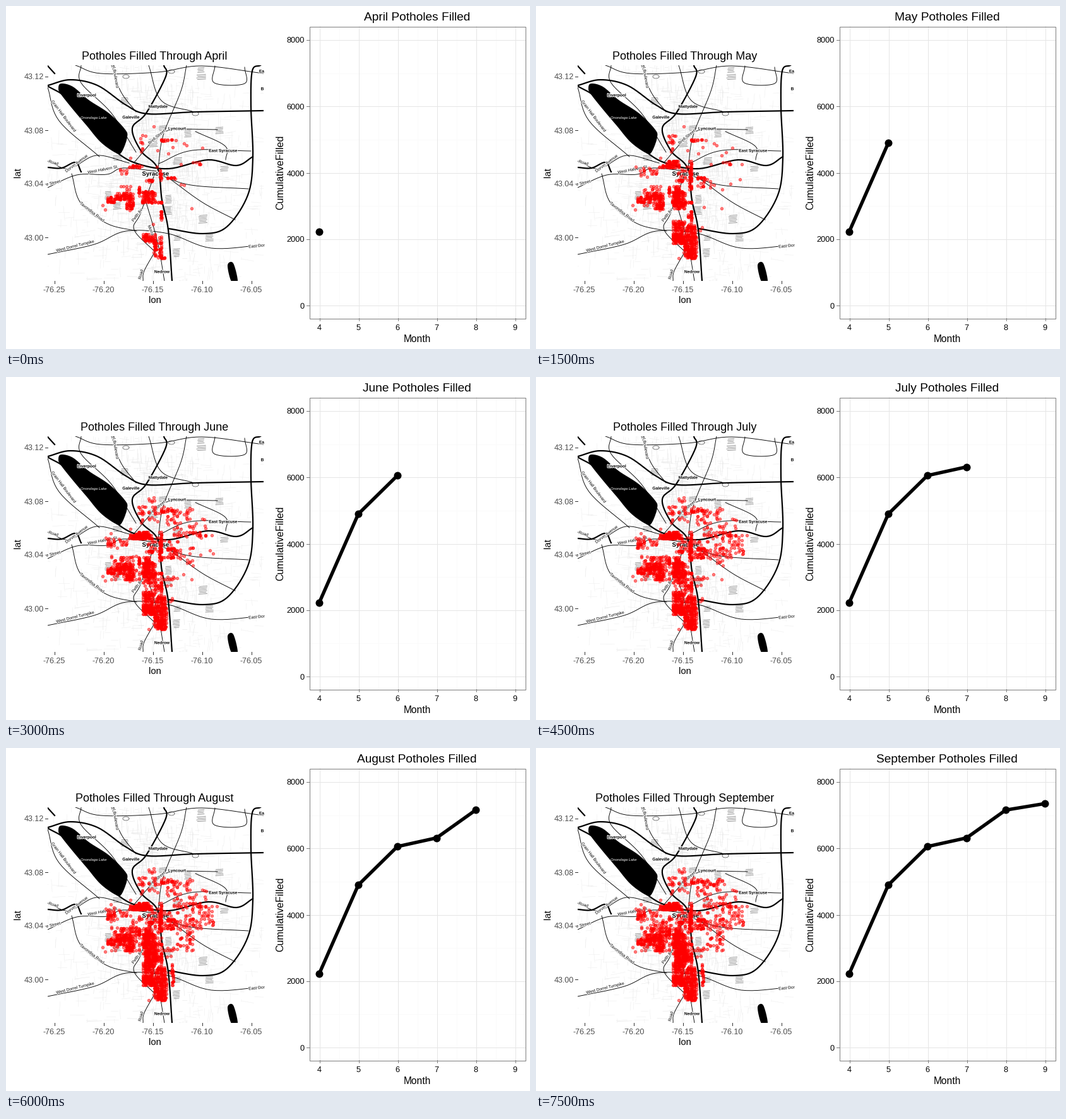
These frames come from a looping animation (830x544 px, 9000 ms). A matplotlib script:

```python
import numpy as np
import matplotlib.pyplot as plt
from matplotlib.animation import FuncAnimation
from matplotlib.collections import LineCollection
from matplotlib.patches import Polygon, Rectangle
from matplotlib.patheffects import withStroke

W, H, DPI = 830, 544, 100
PX = 72 / DPI  # points per pixel
plt.rcParams["font.family"] = "Liberation Sans"

fig = plt.figure(figsize=(W / DPI, H / DPI), dpi=DPI, facecolor="white")
ax = fig.add_axes([0, 0, 1, 1])
ax.set_xlim(0, W)
ax.set_ylim(H, 0)
ax.axis("off")
rng = np.random.default_rng(7)

MONTHS = ["April", "May", "June", "July", "August", "September"]
TOTALS = [2210, 4890, 6050, 6310, 7150, 7345]
MAP_BOX = Rectangle((66, 94), 342, 342, fc="white", ec="none", zorder=0)
ax.add_patch(MAP_BOX)


def text(x, y, s, size, **kw):
    opts = dict(ha="center", va="baseline", rotation_mode="anchor", zorder=9)
    opts.update(kw)
    return ax.text(x, y, s, fontsize=size * PX, **opts)


def line(xs, ys, color, width, **kw):
    return ax.plot(xs, ys, color=color, lw=width * PX, **kw)[0]


def clip(artist):
    artist.set_clip_path(MAP_BOX)
    return artist


def smooth(pts, closed=False):
    """Catmull-Rom curve through the given points."""
    p = np.array(pts, float)
    if closed:
        p = np.vstack([p[-1], p, p[:2]])
    else:
        p = np.vstack([2 * p[0] - p[1], p, 2 * p[-1] - p[-2]])
    t = np.linspace(0, 1, 10)[:, None]
    parts = []
    for a, b, c, d in zip(p, p[1:], p[2:], p[3:]):
        parts.append(0.5 * (2 * b + (c - a) * t + (2 * a - 5 * b + 4 * c - d) * t**2
                            + (3 * b - a - 3 * c + d) * t**3))
    return np.vstack(parts)


def road(*pts, width=0.9):
    xy = smooth(pts)
    clip(line(xy[:, 0], xy[:, 1], "black", width, zorder=3))


def highway(*pts):
    road(*pts, width=2.2)


def water(*pts):
    clip(ax.add_patch(Polygon(smooth(pts, True), fc="black", ec="none", zorder=3)))


def label(x, y, s, angle=0, size=6.6, **kw):
    opts = dict(va="center", weight="normal" if angle else "bold", rotation=angle, zorder=4,
                path_effects=[withStroke(linewidth=1.5, foreground="white")])
    opts.update(kw)
    clip(text(x, y, s, size, **opts))


def streets(n, cx, cy, sx, sy, color):
    """Faint random street grid around a centre."""
    x, y = rng.normal(cx, sx, n), rng.normal(cy, sy, n)
    size = rng.uniform(4, 24, n)
    ang = rng.normal(0, 0.09, n) + np.pi / 2 * rng.integers(0, 2, n)
    dx, dy = size * np.cos(ang) / 2, size * np.sin(ang) / 2
    seg = np.stack([np.c_[x - dx, y - dy], np.c_[x + dx, y + dy]], 1)
    clip(ax.add_collection(LineCollection(seg, colors=color, linewidths=0.5 * PX, zorder=1)))


def parks(*centres):
    rows = []
    for x, y in centres:
        w, h = rng.uniform(11, 17), rng.uniform(8, 14)
        for yy in np.arange(y - h / 2, y + h / 2, 2.4):
            a, b = rng.uniform(0.35, 0.5, 2) * w
            rows.append([(x - a, yy), (x + b, yy - 0.8)])
    clip(ax.add_collection(LineCollection(rows, colors="#777777", linewidths=0.75 * PX, zorder=2)))


# ---- map
streets(900, 235, 265, 45, 75, "#e2e2e2")
streets(1000, 240, 260, 110, 110, "#ececec")
parks((188, 151), (309, 103), (309, 114), (248, 195), (233, 218), (288, 202), (338, 198),
      (346, 259), (272, 247), (177, 242), (162, 301), (257, 307), (255, 325), (271, 369),
      (312, 339), (322, 369), (270, 392), (176, 318))

water((83, 131), (87, 123), (106, 128), (131, 149), (163, 170), (188, 195), (192, 208),
      (183, 232), (174, 233), (150, 216), (128, 190), (106, 164), (87, 140))
water((351, 411), (360, 408), (367, 437), (357, 437))

highway((66, 126), (102, 117), (145, 126), (190, 157), (224, 171), (300, 168), (408, 166))
highway((66, 127), (96, 146), (133, 192), (174, 231), (208, 250), (258, 258), (320, 244),
        (365, 253), (391, 239))
highway((250, 94), (253, 112), (222, 170), (200, 194), (214, 230), (240, 257), (247, 308),
        (257, 355), (263, 436))
highway((403, 94), (390, 103), (388, 160), (391, 241), (383, 300), (350, 350), (312, 361),
        (257, 353))
highway((66, 256), (88, 257), (110, 248), (119, 263))
highway((66, 95), (77, 107))

road((66, 288), (112, 268), (160, 267), (185, 257), (238, 262))
road((66, 246), (100, 258), (143, 237), (195, 249))
road((104, 266), (118, 312), (160, 345), (207, 357))
road((66, 394), (140, 378), (190, 357), (257, 361), (325, 384), (408, 379))
road((167, 94), (182, 136), (206, 168))
road((110, 94), (150, 107), (240, 105), (310, 95), (408, 107))
road((286, 94), (277, 135), (249, 205), (241, 257))
road((331, 95), (330, 122), (378, 123), (378, 97))
road((203, 248), (240, 207), (268, 196), (335, 196))
road((242, 250), (295, 229), (388, 230))
road((300, 199), (347, 222), (348, 244))
road((241, 267), (293, 284), (384, 290))
road((262, 276), (312, 312), (363, 339))
road((235, 268), (213, 329), (203, 355), (236, 390))
road((220, 305), (240, 374), (251, 436))
road((238, 386), (219, 420), (217, 436))
road((119, 94), (119, 122), (167, 170), (206, 232))
road((66, 129), (84, 182), (148, 239))
road((226, 94), (246, 150), (298, 168))

for x, y in [(190, 112), (262, 104), (300, 171)]:
    a = np.linspace(0, 2 * np.pi, 24)
    clip(line(x + 5 * np.cos(a), y + 3 * np.sin(a), "#333333", 0.6, zorder=3))

label(128, 142, "Liverpool")
label(241, 160, "Mattydale")
label(198, 177, "Galeville")
label(271, 195, "Lyncourt")
label(344, 230, "East Syracuse")
label(247, 422, "Nedrow")
label(237, 266, "Syracuse", size=9.6)
label(139, 178, "Onondaga Lake", size=5.8, style="italic", weight="normal", color="white",
      path_effects=[])
label(239, 208, "Brell Street", 40)
label(91, 175, "Grain Hall Boulevard", -53)
label(112, 250, "Dorvin Avenue", 37)
label(153, 260, "West Halvern St", 11)
label(136, 327, "Tavondisa Road", -38)
label(110, 381, "West Dorrel Turnpike", 14)
label(75, 249, "Road", -16)
label(75, 281, "e Street", 13)
label(208, 332, "Pelth Av", 54)
label(229, 356, "Morra", -68)
label(214, 426, "Road", 76)
label(173, 112, "el Boulevard", -80)
label(397, 381, "East Dor", 5)
label(405, 104, "Ea")
label(406, 132, "B")

# ---- potholes, one layer per month
layers = []


def fill(box, base, density):
    """Scatter points in a box, pulled onto nearby streets."""
    lo, hi = np.array(box[:2]), np.array(box[2:])
    n = int(base + density * np.prod(hi - lo))
    p = rng.uniform(lo, hi, (n, 2))
    i, axis = np.arange(n), rng.integers(0, 2, n)
    p[i, axis] = np.round(p[i, axis] / 5) * 5
    return np.clip(p, lo, hi)


def potholes(dense, loose=(), dots=()):
    xy = np.vstack([fill(b, 6, 0.22) for b in dense] + [fill(b, 2, 0.03) for b in loose]
                   + [np.reshape(dots, (-1, 2))]) + 0.5
    layers.append(ax.scatter(xy[:, 0], xy[:, 1], s=(4.4 * PX) ** 2, fc=(1, 0, 0, 0.5),
                             ec=(1, 0, 0, 0.5), lw=PX, zorder=5))


potholes([(193, 252, 214, 255), (245, 211, 264, 213), (243, 260, 245, 277),
          (221, 275, 232, 278), (255, 271, 268, 273), (159, 302, 172, 310),
          (172, 296, 200, 307), (190, 308, 200, 323), (209, 286, 212, 300),
          (215, 293, 235, 312), (237, 310, 248, 312), (244, 323, 247, 338),
          (216, 361, 235, 373), (233, 372, 238, 396), (242, 365, 245, 397),
          (240, 397, 252, 399)],
         [(180, 283, 197, 294), (291, 247, 308, 251), (178, 253, 192, 266),
          (212, 202, 221, 230)],
         [(233, 190), (196, 240), (239, 228), (268, 212), (281, 217), (285, 220), (310, 224),
          (256, 233), (263, 223), (276, 250), (276, 282), (281, 283), (152, 315), (156, 322),
          (293, 320), (232, 345), (238, 254), (300, 247), (305, 250)])
potholes([(216, 340, 234, 376), (237, 347, 253, 398), (206, 245, 226, 256),
          (242, 240, 245, 290), (217, 310, 238, 320), (217, 285, 227, 310)],
         [(170, 288, 202, 322), (221, 256, 240, 278), (238, 330, 250, 348),
          (255, 270, 276, 291), (164, 256, 192, 270), (208, 202, 221, 216),
          (259, 347, 263, 355)],
         [(225, 399), (325, 250), (322, 274), (307, 281), (294, 290), (300, 231), (293, 236),
          (265, 318), (157, 254)])
potholes([(196, 248, 230, 256)],
         [(222, 192, 236, 232), (238, 205, 265, 216), (250, 210, 292, 232),
          (264, 234, 316, 254), (156, 242, 168, 268), (242, 258, 275, 288),
          (286, 268, 295, 300), (166, 282, 212, 322), (216, 316, 270, 334),
          (216, 322, 240, 350)],
         [(290, 207), (294, 209), (313, 225), (327, 279), (280, 312), (262, 353)])
potholes([], [(158, 250, 170, 272), (172, 283, 208, 300), (228, 300, 242, 330),
              (240, 262, 262, 288), (278, 250, 328, 286)], [(333, 250), (316, 226)])
potholes([(218, 320, 238, 340), (262, 342, 264, 380)],
         [(162, 262, 174, 276), (196, 262, 214, 300), (222, 270, 245, 346),
          (270, 290, 295, 322)])
potholes([], [(224, 306, 242, 342), (180, 270, 214, 305), (265, 207, 298, 218)])

# ---- map axes
for i in range(5):
    x = 76.5 + 78 * i
    line([x, x], [436, 440], "#333333", 1)
    text(x, 453.5, f"{-76.25 + 0.05 * i:.2f}", 12.5, color="#4d4d4d")
for i in range(4):
    y = 111.5 + 85 * i
    line([62, 66], [y, y], "#333333", 1)
    text(60, y + 5, f"{43.12 - 0.04 * i:.2f}", 12.5, color="#4d4d4d", ha="right")
text(235.5, 471, "lon", 14.7)
text(23, 264, "lat", 14.7, rotation=90)
map_title = text(235.5, 85, "", 18)


# ---- chart
def cx(month):
    return 496 + 62 * (month - 4)


def cy(v):
    return 474.5 - v * 0.0526


for m in range(4, 10):
    x = cx(m) + 0.5
    line([x, x], [32, 495], "#e5e5e5", 1, zorder=1)
    line([x, x], [495, 499], "#7f7f7f", 1)
    text(x - 0.5, 514, str(m), 12.8)
    if m < 9:
        line([x + 31] * 2, [32, 495], "#fafafa", 1, zorder=0.5)
for v in range(0, 8001, 1000):
    y = np.floor(cy(v)) + 0.5
    major = v % 2000 == 0
    line([480, 823], [y, y], "#e5e5e5" if major else "#fafafa", 1, zorder=1 if major else 0.5)
    if major:
        line([476, 480], [y, y], "#7f7f7f", 1)
        text(473, y + 5, str(v), 12.8, ha="right")
ax.add_patch(Rectangle((480.5, 32.5), 342, 463, fill=False, ec="#7f7f7f", lw=PX, zorder=6))
text(651, 533, "Month", 15.5)
text(439.5, 264, "CumulativeFilled", 16, rotation=90)
chart_title = text(651, 23, "", 19.1)
curve = line([], [], "black", 5.4, marker="o", ms=12 * PX, mew=0, zorder=7,
             solid_joinstyle="round", solid_capstyle="butt")


def update(i):
    map_title.set_text(f"Potholes Filled Through {MONTHS[i]}")
    chart_title.set_text(f"{MONTHS[i]} Potholes Filled")
    curve.set_data([cx(4 + k) for k in range(i + 1)], [cy(v) for v in TOTALS[:i + 1]])
    for k, layer in enumerate(layers):
        layer.set_visible(k <= i)
    return [map_title, chart_title, curve, *layers]


anim = FuncAnimation(fig, update, frames=len(MONTHS), interval=1500, init_func=lambda: update(0),
                     repeat=True, repeat_delay=0, blit=False)
plt.show()
```
